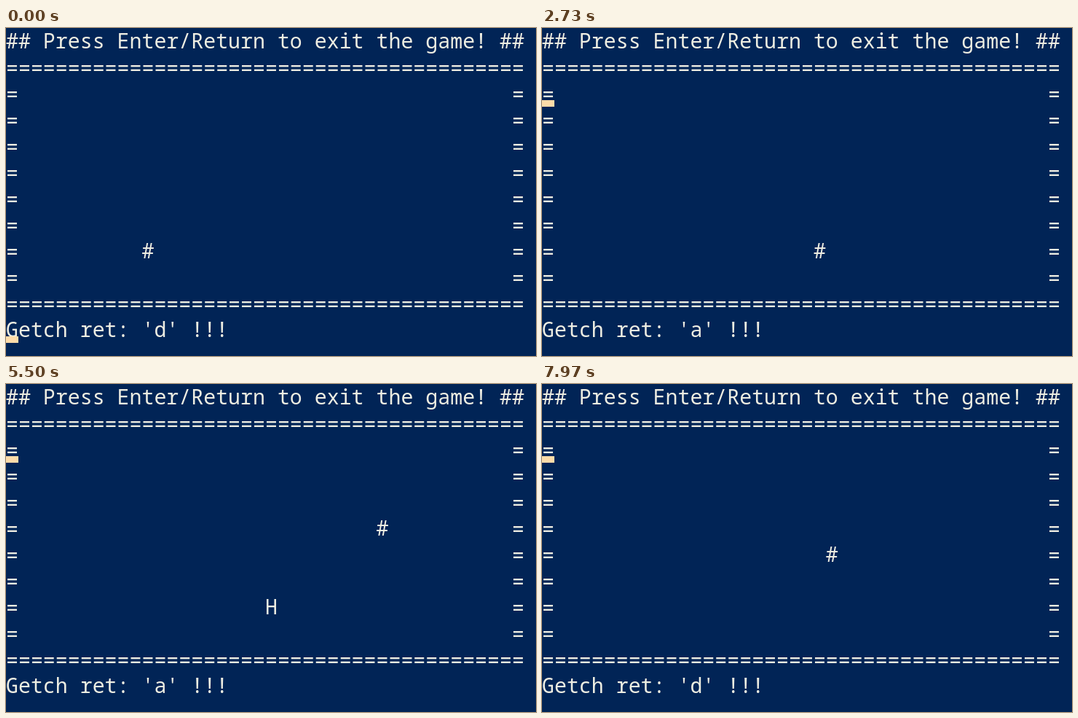
Animation, 728 px wide and 450 px high, one loop 8000 ms. Source, as an HTML page:

```html
<!DOCTYPE html>
<html lang="en">
<head>
<meta charset="utf-8">
<title>Terminal game</title>
<style>
  html, body { margin: 0; width: 100%; height: 100%; overflow: hidden; background: #012456; }
  svg { display: block; width: 728px; height: 450px; background: #012456; }
  text { font: 500 28.25px "Noto Sans Mono", "DejaVu Sans Mono", monospace; fill: #eeede2; white-space: pre; }
  #cursor { fill: #fedba9; }
</style>
</head>
<body>
<svg id="stage" viewBox="0 0 728 450"></svg>
<script>
const LOOP = 8000, FRAMES = 240, TICK = LOOP / FRAMES;
const COL = 16.95, ROW = 36, COLS = 42;
const REPEAT_DELAY = 500, REPEAT_STEP = 31;

const START = { col: 11, row: 8, key: "d" };
const DIRS = { a: [-1, 0], d: [1, 0], w: [0, -1], s: [0, 1] };

// key, time pressed, automatic repeats while held
const PRESSES = [
  ["d", 610, 16], ["a", 2090, 6], ["w", 3050, 0], ["w", 3300, 0],
  ["d", 3760, 10], ["w", 4780, 0], ["a", 4950, 0], ["a", 5385, 20],
  ["s", 6750, 0], ["d", 7040, 12]
];

// column, row, shown from, shown until
const ITEMS = [[33, 7, 870, 1600], [21, 8, 5050, 5950], [23, 3, 6000, 6950]];

// The cursor alternates between two rows, now and then losing a beat.
const SLIPS = [58, 98];
const HIGH_TICKS = [109, 133, 187];

const stage = document.getElementById("stage");

function add(tag, attrs, content = "") {
  const node = document.createElementNS("http://www.w3.org/2000/svg", tag);
  for (const name in attrs) node.setAttribute(name, attrs[name]);
  node.textContent = content;
  return stage.appendChild(node);
}

function place(node, col, row, dy = 0) {
  node.setAttribute("x", col * COL);
  node.setAttribute("y", row * ROW + 28 + dy);
}

function write(content, col, row, dy) {
  const node = add("text", {}, content);
  place(node, col, row, dy);
  return node;
}

const wall = (length, col, row) => write("=".repeat(length), col, row, 1);

write("## Press Enter/Return to exit the game! ##", 0, 0);
wall(COLS, 0, 1);
for (let row = 2; row < 10; row++) {
  wall(1, 0, row);
  wall(1, COLS - 1, row);
}
wall(COLS, 0, 10);

const status = write("", 0, 11);
const player = write("#", START.col, START.row);
const item = write("H", 0, 0);
const cursor = add("rect", { id: "cursor", x: 0, width: 17, height: 9 });

function playerAt(time) {
  const state = { ...START };
  for (const [key, at, repeats] of PRESSES) {
    if (time < at) break;
    const held = time - at - REPEAT_DELAY;
    const extra = held < 0 ? 0 : Math.min(repeats, 1 + Math.floor(held / REPEAT_STEP));
    const [dx, dy] = DIRS[key];
    state.col += dx * (1 + extra);
    state.row += dy * (1 + extra);
    state.key = key;
  }
  return state;
}

function cursorRow(tick) {
  if (HIGH_TICKS.includes(tick)) return 1;
  const slips = SLIPS.filter(slip => tick >= slip).length;
  return (tick + slips) % 2 ? 2 : 11;
}

function draw(elapsed) {
  const tick = Math.min(FRAMES - 1, Math.floor((elapsed % LOOP + 5) / TICK));
  const time = tick * TICK;

  const { col, row, key } = playerAt(time);
  place(player, col, row);
  status.textContent = `Getch ret: '${key}' !!!`;

  const shown = ITEMS.find(([, , from, until]) => time >= from && time < until);
  item.setAttribute("visibility", shown ? "visible" : "hidden");
  if (shown) place(item, shown[0], shown[1]);

  cursor.setAttribute("y", cursorRow(tick) * ROW + 27);
}

const began = performance.now();
function loop() {
  draw(performance.now() - began);
  requestAnimationFrame(loop);
}
loop();
</script>
</body>
</html>
```
